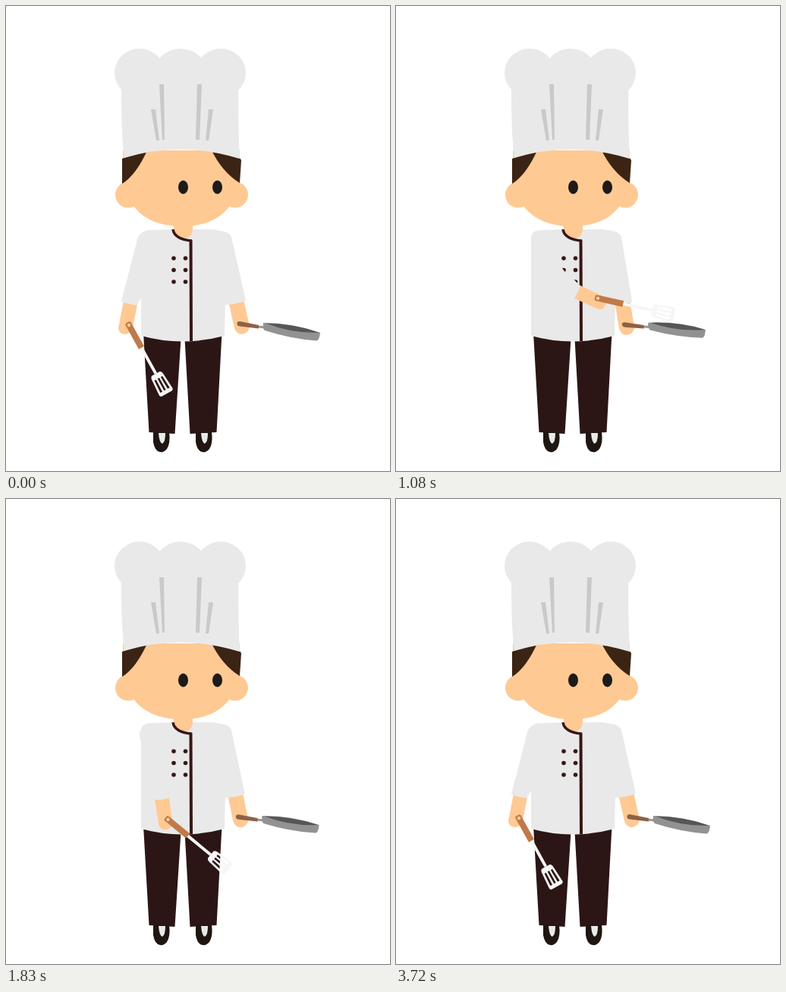
These frames come from a looping animation (506 by 612 pixels, 3750 ms). An HTML page:

```html
<!DOCTYPE html>
<html lang="en">
<head>
<meta charset="utf-8">
<title>Chef with spatula and pan</title>
<style>
  html, body { margin: 0; width: 100%; height: 100%; overflow: hidden; background: #fff; }
  svg { display: block; width: 100vw; height: 100vh; }
  .cloth { fill: #e9e9e9; }
  .skin { fill: #ffc993; }
  .hair { fill: #3b2414; }
  .trousers { fill: #2b1615; }
  .trim { fill: #381715; }
  .shoe { fill: #1f1612; }
  .fold { fill: #c9c9c9; }
</style>
</head>
<body>
<svg viewBox="0 0 506 612">
  <defs>
    <g id="shoe">
      <path class="shoe" d="M-10 561H11Q13 575 8 583Q4 588-1 587Q-8 586-10 574Z"/>
      <path class="cloth" d="M-3 562H6Q6 574 2 576Q-2 575-3 562Z"/>
    </g>
  </defs>

  <path class="trousers" d="M181 430L188.500 561 222.500 563 230.500 438ZM235.500 438L242.500 563 277.500 561 284.500 430Z"/>
  <use href="#shoe" x="204"/>
  <use href="#shoe" x="260"/>

  <g class="skin">
    <circle cx="161" cy="248.500" r="17"/>
    <circle cx="302" cy="248.500" r="17"/>
    <path d="M154 190V215C154 268 188 290 232 290C276 290 308 268 308 215V190Z"/>
  </g>
  <path class="hair" d="M153 201L187 188Q172 222 153 234ZM270 188L308 200 310 203 308 233Q284 218 270 188Z"/>
  <g class="cloth">
    <path d="M152 100V130Q152 165 155.500 200Q232 177 308 201Q306 165 306 100Z"/>
    <ellipse cx="176" cy="88" rx="33" ry="32"/>
    <circle cx="230" cy="92" r="36"/>
    <ellipse cx="283" cy="88" rx="33" ry="32"/>
  </g>
  <path class="fold" d="M202 103H208L209 176H206ZM191 136H197L202 177H198ZM252 103H258L255 176H250ZM267 136H273L267 177H263Z"/>
  <g fill="#1d1a18">
    <ellipse class="eye" cx="233.500" cy="238.500"/>
    <ellipse class="eye" cx="278.500" cy="238.500"/>
  </g>

  <path class="cloth" d="M178 306Q178 295 190 295L220 294H272Q290 296 291 304L288 434Q232 449 178 434Z"/>
  <path class="skin" d="M221 280V293Q224 305 234 306Q246 305 246 293V280Z"/>
  <path d="M220 294Q222 307 245 309" fill="none" stroke="#381715" stroke-width="3.500"/>
  <path class="trim" d="M241.500 308H245.500L246 441H242Z"/>
  <g class="trim" id="buttons"></g>

  <g id="panArm">
    <path class="skin" d="M293 388L301 424Q304 432 311 432Q320 430 321 422L313 386Z"/>
    <path class="cloth" d="M272 296Q293 294 297 304L316 388Q303 393 288 393L280 320Z"/>
    <g id="pan">
      <path d="M332 422L341 423" stroke="#999" stroke-width="3"/>
      <path fill="#8e6145" d="M308 415L333 420V424.500L308 421.500Q304 421 304.500 417Q305 415 308 415Z"/>
      <path fill="#929292" d="M339 417Q378 417 414 430Q413 440 409 440.500Q375 438 341 427Q338 425 339 417Z"/>
      <path fill="#565656" d="M342 417.500Q380 418 413 430Q376 431 342 417.500Z"/>
    </g>
  </g>

  <g id="arm">
    <path class="cloth" d="M190 295Q176 296 173 307L157 370 176 376 181 362 185 325 200 306Z"/>
    <g id="forearm">
      <path class="skin" d="M155 388L148 424Q149 432 158 432Q165 431 167 423L174 388Z"/>
      <path class="cloth" d="M157 368L152 389Q162 393 172 394L186 371 178 362Z"/>
      <g transform="translate(162 420)">
        <g id="spatula">
          <path fill="#f6f6f6" d="M-2 32H2V73H-2Z"/>
          <path fill="#f6f6f6" fill-rule="evenodd" d="M-6 73H6Q8 74 8.500 77L10 100Q10 103 7 103H-7Q-10 103-10 100L-8.500 77Q-8 74-6 73ZM-6 80L-7 98H-4L-3.500 80ZM-1.300 80V98H1.300V80ZM3.500 80L4 98H7L6 80Z"/>
          <path fill="#c0794a" d="M-3-4H3L4-2V34H-4V-2Z"/>
          <circle r="2.200" fill="#f5cda4"/>
        </g>
      </g>
    </g>
  </g>
</svg>
<script>
const LOOP = 3750, STEP = 30;
const get = id => document.getElementById(id);
const eyes = document.querySelectorAll('.eye');

for (const y of [332, 347.5, 363])
  for (const x of [221, 236.5])
    get('buttons').innerHTML += `<circle cx="${x}" cy="${y}" r="2.800"/>`;

// Monotone cubic curve through [time, value] points.
function curve(...keys) {
  const slope = i => keys[i] && keys[i + 1]
    ? (keys[i + 1][1] - keys[i][1]) / (keys[i + 1][0] - keys[i][0]) : 0;
  const tangent = i => {
    const a = slope(i - 1), b = slope(i);
    return a * b > 0 ? 2 * a * b / (a + b) : 0;
  };
  return t => {
    const i = keys.findIndex(k => k[0] > t) - 1;
    if (i === -1) return keys[0][1];
    if (i < 0) return keys[keys.length - 1][1];
    const [t0, v0] = keys[i], [t1, v1] = keys[i + 1], d = t1 - t0, p = (t - t0) / d, q = 1 - p;
    return v0 * q * q * (1 + 2 * p) + v1 * p * p * (3 - 2 * p)
      + d * p * q * (tangent(i) * q - tangent(i + 1) * p);
  };
}

// Angles in degrees; positive raises the limb towards the right.
const shoulder = curve([270, 0], [810, 48], [1350, 38], [1830, 28], [2040, 0]);
const elbow = curve([270, 0], [810, 32], [1350, 32], [1830, -8], [2040, 0]);
const swing = curve([270, 29], [810, 87.5], [1350, 63], [1830, 50.5], [2190, 18], [2460, 18], [2700, 29]);
const panLift = curve([270, 0], [810, 3.7], [1350, 2.6], [1830, 0.8], [2100, 0]);

// Double blink, repeated.
function eyeOpen(t) {
  const u = (t - 570) % 1080;
  const d = Math.min(Math.abs(u - 60), Math.abs(u - 330), 90);
  return (1 - Math.cos(Math.PI * d / 90)) / 2;
}

function turn(id, angle, x = 0, y = 0) {
  get(id).setAttribute('transform', `rotate(${angle} ${x} ${y})`);
}

function draw(now) {
  const time = now % LOOP, t = time - time % STEP;
  const a = shoulder(t), b = elbow(t), lift = panLift(t), open = eyeOpen(t);
  turn('arm', -a, 190, 304);
  turn('forearm', -b, 166, 372);
  turn('spatula', a + b - swing(t));
  turn('panArm', lift, 288, 305);
  turn('pan', -1.85 * lift, 310, 418);
  eyes.forEach(eye => {
    eye.setAttribute('rx', 6.5 * open);
    eye.setAttribute('ry', 8.9 * open);
  });
  requestAnimationFrame(draw);
}
requestAnimationFrame(draw);
</script>
</body>
</html>
```
